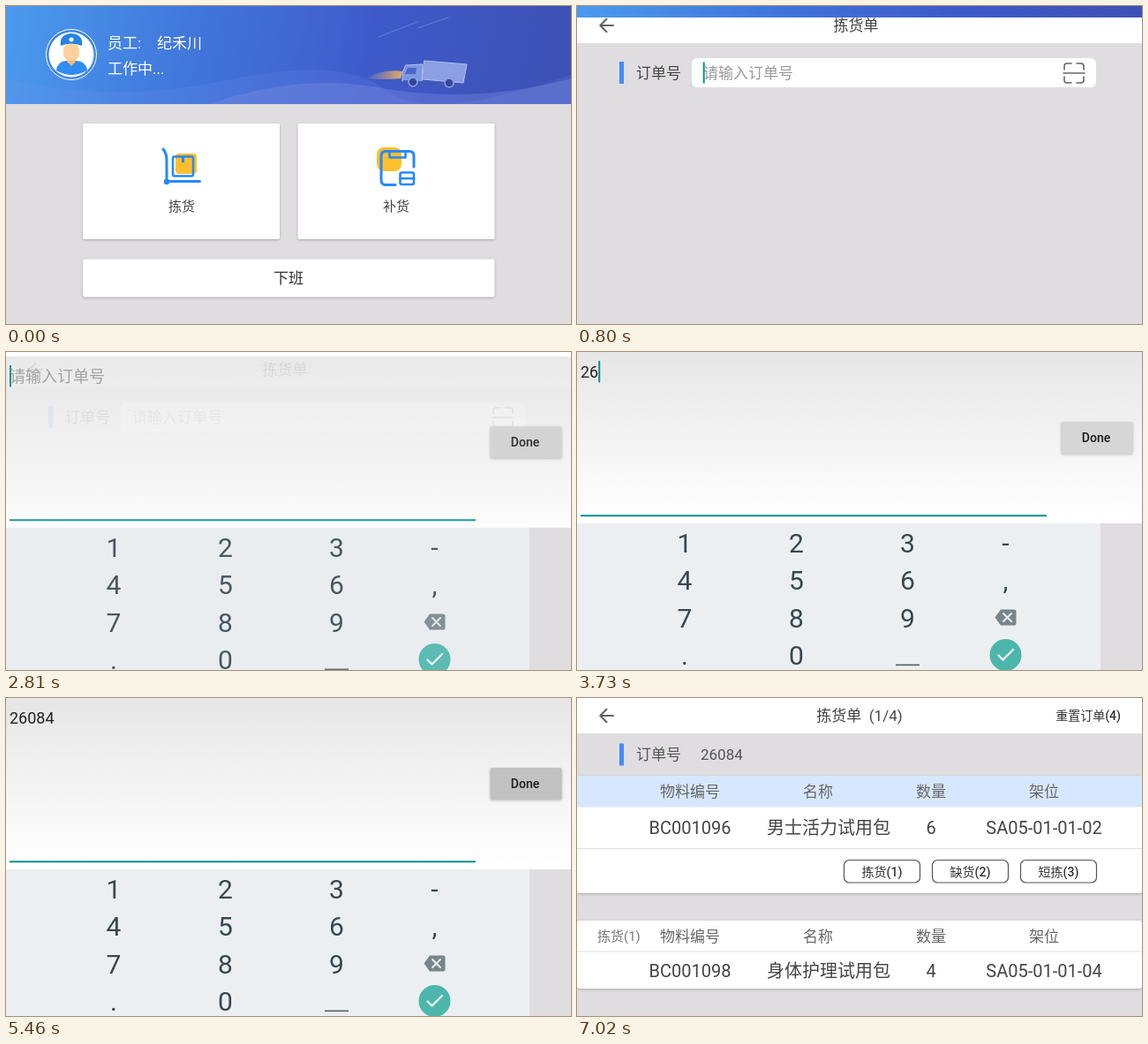
Recreate the animation shown at these times as an HTML page with a canvas. Size 640 by 360 pixels, loop 7990 ms.

```html
<!DOCTYPE html>
<html lang="zh-CN">
<head>
<meta charset="utf-8">
<style>
html, body { margin: 0; height: 100%; overflow: hidden; background: #dfdde0; }
canvas { display: block; width: 100vw; height: 100vh; }
</style>
</head>
<body>
<canvas id="stage"></canvas>
<script>
const LOOP = 7990;
const FONT = 'Roboto, "Noto Sans CJK SC", "Noto Sans CJK JP", sans-serif';
const GREY = '#dfdde0', BLUE = '#2688fb', YELLOW = '#fdbf2d', TEAL = '#0b8a8c';
const canvas = document.getElementById('stage');
const ctx = canvas.getContext('2d');
const ratio = window.devicePixelRatio || 1;
canvas.width = 640 * ratio;
canvas.height = 360 * ratio;

// Text is placed by its vertical centre.
function text(str, x, y, size, color, align = 'left', weight = 400) {
  ctx.font = `${weight} ${size}px ${FONT}`;
  ctx.textAlign = align;
  ctx.fillStyle = color;
  ctx.fillText(str, x, y + size * 0.36);
}
const label = (str, x, y, size, color, weight) => text(str, x, y, size, color, 'center', weight);

function rect(x, y, w, h, color) {
  ctx.fillStyle = color;
  ctx.fillRect(x, y, w, h);
}

function round(x, y, w, h, r, fill, stroke, width = 1) {
  ctx.beginPath();
  ctx.roundRect(x, y, w, h, r);
  paint(fill, stroke, width);
}

function paint(fill, stroke, width) {
  if (fill) { ctx.fillStyle = fill; ctx.fill(); }
  if (stroke) { ctx.strokeStyle = stroke; ctx.lineWidth = width; ctx.stroke(); }
}

function circle(x, y, r, fill, stroke, width = 1) {
  ctx.beginPath();
  ctx.arc(x, y, r, 0, 7);
  paint(fill, stroke, width);
}

function shape(d, fill, stroke, width = 1) {
  const path = new Path2D(d);
  if (fill) { ctx.fillStyle = fill; ctx.fill(path); }
  if (stroke) { ctx.strokeStyle = stroke; ctx.lineWidth = width; ctx.stroke(path); }
}

function card(x, y, w, h, r, fill = '#fff') {
  ctx.save();
  ctx.shadowColor = 'rgba(0,0,0,.25)';
  ctx.shadowBlur = 3 * ratio;
  ctx.shadowOffsetY = ratio;
  round(x, y, w, h, r, fill);
  ctx.restore();
}

function gradient(x0, y0, x1, y1, ...colors) {
  const g = ctx.createLinearGradient(x0, y0, x1, y1);
  colors.forEach((c, i) => g.addColorStop(i / (colors.length - 1), c));
  return g;
}

function layer(alpha, dy, draw) {
  ctx.save();
  ctx.globalAlpha = alpha;
  ctx.translate(0, dy);
  draw();
  ctx.restore();
}

function banner(height) {
  rect(0, 0, 640, height, gradient(0, 0, 610, 110, '#4b9bee', '#4177dc', '#3f5bcb', '#3d51b6'));
}

function truck() {
  shape('M408 82 Q428 71 449 74 L447 82 Q428 84 408 82Z', gradient(408, 0, 449, 0, 'rgba(190,150,150,.1)', '#e3ad62'));
  shape('M474 62 L522 66 L518 87 L472 83Z', '#8b9fe2', '#b1c0f0', 1);
  shape('M453 67 L472 66 L471 87 L449 85 L449 76Z', '#7f96e2', '#b1c0f0', 1);
  shape('M455 70 L465 70 L464 77 L452 77Z', '#4a67c8');
  shape('M450 84 L518 88 L517 92 L450 89Z', '#4059b5');
  for (const [x, y] of [[461, 86], [502, 87]]) circle(x, y, 5, '#34479c', '#8fa2e2', 1.5);
}

function avatar() {
  circle(74, 55, 28.5, '#3f88e4', '#fff', 1);
  circle(74, 55, 25.5, '#fff');
  shape('M57 73 Q58 63 68 62 L80 62 Q91 63 92 73 Q74 83 57 73Z', '#2f8df0');
  shape('M69 58 H79 V63 L74 68 L69 63Z', '#f6b878');
  round(65, 42, 18, 20, 8, '#ffd09a');
  shape('M62 45 Q60 32 74 31 Q88 32 86 45 Q74 40 62 45Z', '#2583e6');
  circle(74, 38, 2.5, '#fff');
}

function home() {
  rect(0, 0, 640, 360, GREY);
  banner(111);
  shape('M0 82 Q120 112 250 84 T430 95 T640 78 V111 H0Z', 'rgba(120,150,235,.16)');
  shape('M230 111 Q330 76 420 92 Q530 112 640 82 V111Z', 'rgba(130,145,225,.34)');
  shape('M422 35 L466 18 M466 25 L501 13', null, 'rgba(150,180,245,.4)', 1);
  truck();
  avatar();
  text('员工:', 115, 42, 17, '#fff');
  text('纪禾川', 171, 42, 17, '#fff');
  text('工作中...', 115, 71, 17, '#fff');

  card(87, 133, 223, 131, 2);
  card(330.5, 133, 223, 131, 2);
  card(87, 286.5, 466.5, 43, 2);
  label('拣货', 199, 227, 15, '#444');
  label('补货', 442, 227, 15, '#444');
  label('下班', 320, 308, 17, '#333');

  round(192, 167, 24, 23, 4, YELLOW);
  round(189, 170.5, 23, 22, 2, null, BLUE, 2.5);
  shape('M200.5 171 V176', null, BLUE, 3);
  shape('M178 162 Q182 167 182 174 V198.5 H219.5', null, BLUE, 3);
  circle(182, 199, 3.2, BLUE);

  round(420, 160, 28, 27, 8, YELLOW);
  shape('M441 202.5 H430 Q425 202.5 425 197 V170 Q425 164.500 430 164.500 H457 Q462 164.500 462 170 V182', null, BLUE, 3);
  shape('M434.500 165 V171.500 H452.500 V165', null, BLUE, 2.6);
  round(446.5, 188.5, 15.5, 13.5, 2, null, BLUE, 2.6);
  shape('M447 195.300 H462', null, BLUE, 2.4);
}

function header(title) {
  rect(0, 0, 640, 40, '#fff');
  shape('M41 20 H27 M33.500 12.800 L26.300 20 L33.500 27.200', null, '#616161', 2);
  label(title, title.length > 3 ? 320 : 316, 20, 17, '#444');
}

function orderPage(value, cursor, loading) {
  rect(0, 0, 640, 360, GREY);
  header('拣货单');
  rect(48, 61, 5, 25, '#448aff');
  text('订单号', 67, 73.5, 17, '#444');
  round(130, 57, 458, 33, 6, '#fff');
  text(value || '请输入订单号', 143, 73.5, 17, value ? '#444' : '#9a9a9a');
  if (cursor) rect(142.7, 61.5, 2, 24, '#009688');
  shape('M552 70 V66 Q552 63 555 63 H560 M566 63 H571 Q574 63 574 66 V70 M574 78 V82 Q574 85 571 85 H566 M560 85 H555 Q552 85 552 82 V78 M551 74 H575',
    null, '#666', 1.6);
  if (loading) text('读取中...', 286, 270, 17.5, '#666');
}

function keyboard(value, cursor, pressed) {
  rect(0, 0, 640, 194, gradient(0, 0, 0, 190, '#e6e6e6', '#f3f3f3', '#fff'));
  text(value || '请输入订单号', 4, 23, 18, value ? '#222' : '#9a9a9a');
  if (cursor) rect(4 + (value ? ctx.measureText(value).width : 0), 10, 2, 24.5, TEAL);
  rect(4, 184.3, 528, 2, TEAL);
  card(548.5, 79, 81, 36, 2, pressed ? '#c1c1c1' : '#d6d6d6');
  label('Done', 588, 97, 14, '#1c1c1c', 500);

  rect(593, 194, 47, 166, GREY);
  rect(0, 194, 593, 166, '#eceff1');
  ['123-', '456,', '789', '.0'].forEach((row, r) =>
    [...row].forEach((key, c) => label(key, [122, 248.5, 374.5, 485.5][c], 216.3 + r * 42.3, 30, '#37474f')));
  rect(361, 353.5, 27, 1.6, '#546067');
  shape('M480 291.500 H495 Q497.500 291.500 497.500 294 V307 Q497.500 309.500 495 309.500 H480 L473.500 300.500Z', '#78868c');
  shape('M483 296 L492 305 M492 296 L483 305', null, '#eceff1', 2);
  circle(485.5, 343, 18, '#4db6ac');
  shape('M477.500 343.500 L482.500 348.500 L494 337', null, '#fff', 2.2);
}

function tableHead(y) {
  [['物料编号', 128], ['名称', 273], ['数量', 401], ['架位', 529]].forEach(([s, x]) => label(s, x, y, 17, '#666'));
}

function tableRow(y, code, name, count, shelf) {
  label(code, 128, y, 20, '#444');
  label(name, 285, y, 20, '#444');
  label(count, 401, y, 20, '#444');
  label(shelf, 529, y, 20, '#444');
}

function resultPage() {
  rect(0, 0, 640, 360, GREY);
  header('拣货单  (1/4)');
  text('重置订单(4)', 616, 20, 14, '#333', 'right', 500);
  rect(48, 51.5, 5, 25, '#448aff');
  text('订单号', 67, 64, 17, '#555');
  text('26084', 140, 64, 17, '#555');

  card(0, 88, 640, 133, 3);
  rect(0, 88, 640, 35.5, '#d7e7ff');
  tableHead(106);
  tableRow(147, 'BC001096', '男士活力试用包', '6', 'SA05-01-01-02');
  rect(0, 170, 640, 1, '#dedede');
  ['拣货(1)', '缺货(2)', '短拣(3)'].forEach((s, i) => {
    const x = 302.5 + i * 100;
    round(x, 183.5, 86, 25.5, 6, null, '#555', 1.2);
    label(s, x + 43, 196.5, 14, '#333', 500);
  });

  card(0, 252, 640, 77, 3);
  text('拣货(1)', 23, 269.5, 15, '#777');
  tableHead(269.5);
  rect(0, 286.5, 640, 1, '#dedede');
  tableRow(309, 'BC001098', '身体护理试用包', '4', 'SA05-01-01-04');
}

// Value of the last step reached, from [time, ...values] entries.
const stepAt = (t, steps) => steps.filter(s => s[0] <= t).pop().slice(1);
const PAGE_IN = [[500, 0.35, 28], [650, 0.8, 9], [800, 1, 2], [990, 1, 1], [1050, 1, 0]];
const KEYS_IN = [[2500, 0.3, 26], [2650, 0.7, 12], [2810, 0.9, 5], [2960, 1, 0], [5660, 0.4, 5]];
const TYPED = [[0, 0], [3590, 1], [3730, 2], [3930, 3], [4300, 4], [4800, 5]];

function draw(t) {
  const value = '26084'.slice(0, stepAt(t, TYPED)[0]);
  if (t < 500) return home();
  if (t < 1050) {
    home();
    layer(...stepAt(t, PAGE_IN), () => orderPage('', true));
    return banner(13);
  }
  if (t < 6980 && (t < 2500 || t >= 5660)) orderPage(value, t < 1500 || (t >= 1990 && t < 2500), t >= 5990);
  if (t >= 2500 && t < 5680) {
    if (t < 5660) orderPage('', false);
    const cursor = t < 2980 || (t >= 3480 && t < 5320);
    layer(...stepAt(t, KEYS_IN), () => keyboard(value, cursor, t >= 5320));
  }
  if (t >= 6980) {
    if (t < 7020) orderPage(value, false, true);
    layer(t < 7020 ? 0.6 : 1, 0, resultPage);
  }
}

function frame() {
  ctx.setTransform(ratio, 0, 0, ratio, 0, 0);
  draw(performance.now() % LOOP);
  requestAnimationFrame(frame);
}
ctx.lineCap = ctx.lineJoin = 'round';
frame();
</script>
</body>
</html>
```
